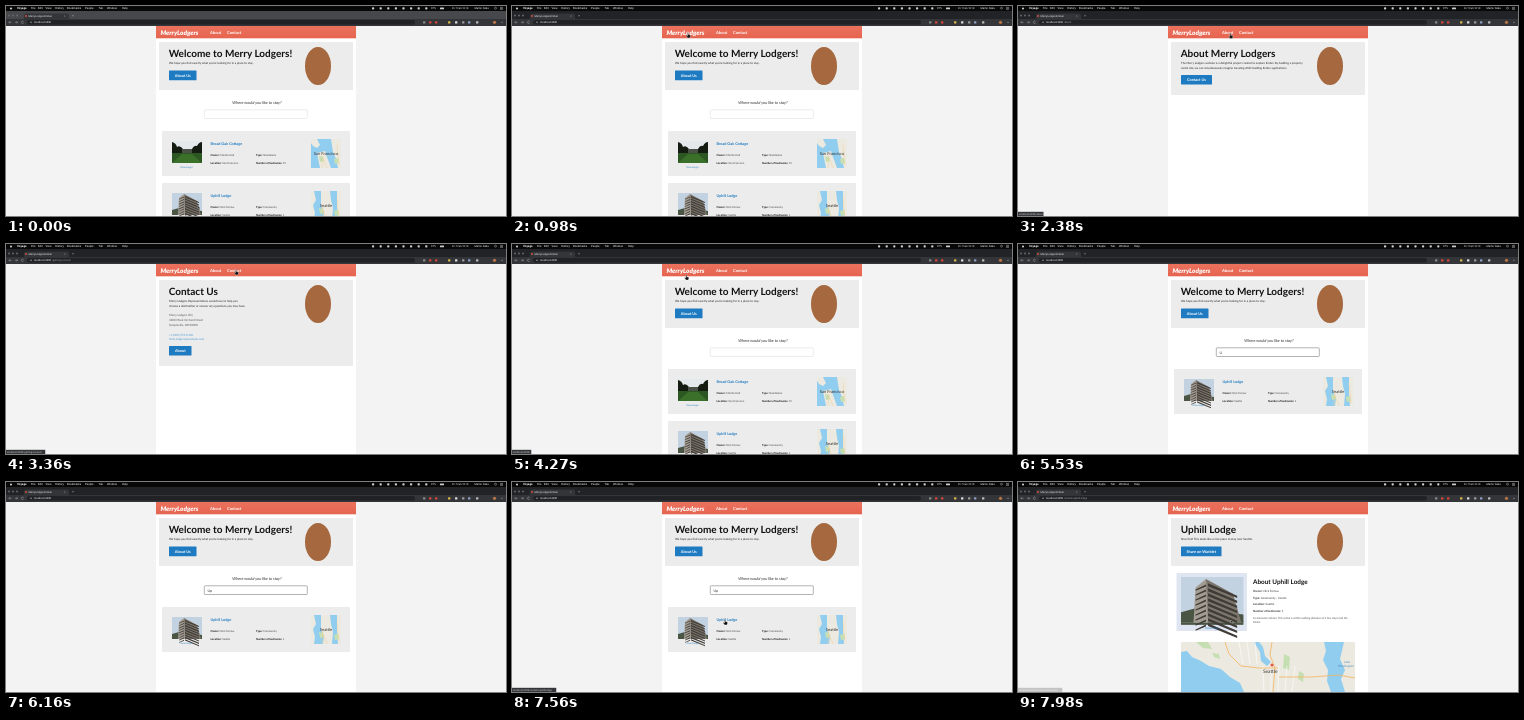
Animation of 500x210 px, one loop 8 s. Source, as an HTML page:

```html
<!DOCTYPE html>
<html lang="en">
<head>
<meta charset="utf-8">
<title>MerryLodgers</title>
<style>
html, body { margin: 0; width: 100%; height: 100%; overflow: hidden; background: #f3f3f3; }
svg { display: block; width: 100vw; height: 100vh; }
svg svg { width: auto; height: auto; }
text { font-family: Lato, sans-serif; white-space: pre; text-rendering: geometricPrecision; }
.ui text { font-family: Roboto, sans-serif; }
</style>
</head>
<body>
<svg id="stage" viewBox="0 0 500 210"></svg>
<script>
const LOOP = 8000;
const BLUE = '#1f7bc1', GREY = '#ececec', WATER = '#90cdef', LAND = '#ece9e1', HOST = 'localhost:4200';
const stage = document.getElementById('stage');

const rect = (x, y, w, h, fill, more = '') =>
  `<rect x="${x}" y="${y}" width="${w}" height="${h}" fill="${fill}" ${more}/>`;
const text = (x, y, size, str, fill = '#222', more = '') =>
  `<text x="${x}" y="${y}" font-size="${size}" fill="${fill}" ${more}>${str}</text>`;
const path = (d, fill, more = '') => `<path d="${d}" fill="${fill}" ${more}/>`;
const dot = (x, y, r, fill) => `<circle cx="${x}" cy="${y}" r="${r}" fill="${fill}"/>`;
const group = (id, body, more = '') => `<g id="${id}" ${more}>${body}</g>`;
const shift = (x, y, body, s = 1) => `<g transform="translate(${x} ${y}) scale(${s})">${body}</g>`;
const frame = (x, y, w, h, body) =>
  `<svg x="${x}" y="${y}" style="width:${w}px;height:${h}px">${body}</svg>`;
const BOLD = 'font-weight="700"', HEAVY = 'font-weight="900"', MID = 'text-anchor="middle"';

function browser() {
  const menu = [[25, 'File'], [32, 'Edit'], [39.5, 'View'], [49, 'History'], [61, 'Bookmarks'],
    [79, 'People'], [92.5, 'Tab'], [101, 'Window'], [116, 'Help']];
  let s = rect(0, 0, 500, 5, '#080808') + rect(0, 5, 500, 8.5, '#222327', 'id="strip"') + rect(0, 13, 500, 7, '#343539');
  s += dot(5, 2.4, 1, '#ddd') + text(11, 3.4, 2.9, 'Voyage', '#fff', BOLD);
  s += menu.map(([x, label]) => text(x, 3.4, 2.8, label, '#fff')).join('');
  for (let x = 366; x < 420; x += 7.6) s += rect(x, 1.3, 2.2, 2.2, '#ccc', 'rx=".7"');
  s += text(425, 3.4, 2.7, '97%', '#fff') + rect(434, 1.5, 4, 1.8, '#ccc', 'rx=".4"');
  s += text(446, 3.4, 2.5, 'Fri 7 Feb 18:18', '#fff') + text(468.5, 3.4, 2.6, 'Martin Falke', '#fff');
  s += '<circle cx="489.5" cy="2.2" r="1" fill="none" stroke="#ddd" stroke-width=".4"/>';
  s += path('M494 1.4h3M494 2.4h3M494 3.4h3', 'none', 'stroke="#ddd" stroke-width=".4"');
  s += [3, 7, 11].map(x => dot(x, 9.5, 1, '#66676b')).join('');
  s += path('M16 13.5q2 0 2-2v-2q0-2 2-2h41q2 0 2 2v2q0 2 2 2z', '#343539');
  s += dot(20, 10, .9, '#e0523b') + text(22.5, 10.9, 2.6, 'MerryLodgersEmber', '#eee');
  s += text(58, 10.9, 2.8, '×', '#bbb') + text(66, 11, 3.5, '+', '#bbb');
  s += rect(21, 14.1, 388, 4.5, '#212226', 'rx="2.2"');
  s += path('M5.5 16.3h-2.6m1-1l-1 1 1 1M9 16.3h2.6m-1-1l1 1-1 1M17.6 15.6a1.2 1.2 0 1 0 0 1.4',
    'none', 'stroke="#bbb" stroke-width=".45"');
  s += dot(25, 16.3, .8, '#999') + text(28, 17.2, 2.6, HOST, '#fff');
  s += '<text id="url" x="45.7" y="17.2" font-size="2.6" fill="#a5a5a8"></text>';
  const icons = [[417, '#888'], [423, '#d9453a'], [429, '#d9453a'], [442, '#d8b84a'], [449, '#ddd'],
    [456, '#999'], [462, '#8aa0c8'], [470, '#bbb']];
  s += icons.map(([x, c]) => rect(x, 15.2, 2.4, 2.4, c, 'rx=".6"')).join('');
  return s + dot(488.5, 16.3, 1.6, '#b97545') + dot(496, 16.3, .5, '#ccc');
}

const nav = rect(150, 20, 200, 12.3, 'url(#red)')
  + text(154.5, 28.6, 6.4, 'MerryLodgers', '#fff', HEAVY + ' font-style="italic"')
  + text(204, 28, 4.1, 'About', '#fff', BOLD) + text(221, 28, 4.1, 'Contact', '#fff', BOLD);

// Grey banner with heading, mascot shape and button
const banner = (h, title, body, btnY, btnW, label) => rect(153, 36, 194, h, GREY)
  + text(162.7, 51, 10, title, '#111', BOLD) + body
  + '<ellipse cx="312" cy="60" rx="13" ry="19" fill="#a5683f"/>'
  + rect(163, btnY, btnW, 9.6, BLUE, 'rx=".5"')
  + text(163 + btnW / 2, btnY + 6.2, 3.85, label, '#fff', BOLD + ' ' + MID);

const lawn = rect(0, 0, 30, 22, '#e4e9ec') + path('M0 13V1q4 1 5 5 3-2 6 2h9q2-4 5-3 2-4 5-4v12z', '#141c12')
  + rect(10, 8, 10, 4, '#4b5047') + rect(0, 12, 30, 10, '#2c5622') + path('M0 22l10-9h10l10 9z', '#3a7029');

function tower() {
  let s = rect(0, 0, 30, 22, '#c3d2e1') + path('M0 22v-5l7-2 23 3v4z', '#4a5544')
    + path('M12 1l13 7 4 14H12z', '#7d766d') + path('M12 1L7 5 6 22h7z', '#a29c92');
  for (let y = 3; y < 23; y += 2.4)
    s += path(`M7 ${y + 3}l5-2.4v1l-5 2zM13 ${y}l14 6v1.1l-14-5.7z`, '#403c37');
  return s;
}

const cityMap = (label, land) => rect(0, 0, 30, 29, WATER) + path(land, LAND)
  + path('M8 17l4 1 1 4-4 1zM23 20l4-1 1 5-4 1z', '#c5dfb2')
  + path('M11 29L12 15M12 19l4 10M26 6l2 20', 'none', 'stroke="#f2cf8e" stroke-width=".5"')
  + text(15, 15.5, 4.1, label, '#333', MID);
const bayMap = cityMap('San Francisco', 'M0 0h6l3 6-3 3-4-2-2-3zM6 14l8-2 2 6 4 11H9zM20 0h10v29h-3l-2-9-3-7z');
const soundMap = cityMap('Seattle', 'M0 0h3l2 9-3 5 2 8-1 7H0zM10 0h9l1 9 2 8-1 12H12l1-8-3-6zM26 0h4v29h-3l-1-12z');

function card(home) {
  const fact = (x, y, key, val) =>
    text(x, y, 2.7, `<tspan font-weight="700" fill="#111">${key}:</tspan> ${val}`, '#444');
  return rect(156, 125, 188, 45, GREY) + frame(166, 135, 29.5, 22, home.photo)
    + text(180.5, 162.3, 2.4, 'View Larger', BLUE, MID)
    + text(204.5, 139.3, 3.75, home.title, BLUE, BOLD)
    + fact(204.5, 149.7, 'Owner', home.owner) + fact(250, 149.7, 'Type', home.type)
    + fact(204.5, 158, 'Location', home.city) + fact(250, 158, 'Number of bedrooms', home.beds)
    + frame(305, 133, 30, 29, home.map);
}
const cottage = { title: 'Broad Oak Cottage', owner: 'Merida Holt', type: 'Standalone', city: 'San Francisco', beds: 15, photo: lawn, map: bayMap };
const lodge = { title: 'Uphill Lodge', owner: 'Nick Farrow', type: 'Community', city: 'Seattle', beds: 1, photo: tower(), map: soundMap };

const home = banner(48, 'Welcome to Merry Lodgers!',
    text(163, 58.4, 2.9, "We hope you find exactly what you're looking for in a place to stay."), 64.6, 27.5, 'About Us')
  + text(251, 98.4, 4, 'Where would you like to stay?', '#333', MID + ' font-style="italic"')
  + rect(198.3, 103.8, 103, 8.7, '#fff', 'id="field" rx=".8" stroke-width=".5"')
  + '<text id="query" x="201.5" y="109.5" font-size="3.6" fill="#333"></text>'
  + group('all', card(cottage) + shift(0, 52, card(lodge))) + group('found', card(lodge));

const about = banner(53, 'About Merry Lodgers',
  text(163, 58.4, 2.85, 'The Merry Lodgers website is a delightful project created to explore Ember. By building a property')
  + text(163, 63, 2.85, 'rental site, we can simultaneously imagine traveling AND building Ember applications.'),
  69, 31, 'Contact Us');

const contact = banner(86, 'Contact Us',
  text(163, 58.4, 2.9, 'Merry Lodgers Representatives would love to help you')
  + text(163, 63, 2.9, 'choose a destination or answer any questions you may have.')
  + ['Merry Lodgers HQ', '3480 Mock Orchard Street', 'Sampleville, OR 00000']
    .map((line, i) => text(163, 72.4 + i * 4.7, 2.9, line, '#555')).join('')
  + text(163, 91.5, 2.9, '+1 (000) 555-0100', '#4d9bd3') + text(163, 96.2, 2.9, 'hello.lodgers@example.com', '#4d9bd3'),
  102, 22.5, 'About');

function bigMap() {
  let s = rect(0, 0, 174, 50, LAND);
  s += path('M0 10l6-1 5 6 9 4 8 5 12 3 9 8 10 6 4 9H0z', WATER);
  s += path('M78 0l4 5 2 9 6 6-4 4-6-5-1-9-6-10zM143 0l2 9-3 9 5 10-1 11 4 11h14l-4-13 4-9-5-11 4-17z', WATER);
  s += path('M15 0l12 0 4 7-9-1zM31 11l7 1 1 5-6-2zM103 12l6 3-1 13-6-2zM118 29l5 3-1 8-5-3z', '#c5dfb2');
  for (let i = 0; i < 8; i++)
    s += path(`M${58 + i * 8} ${i < 3 ? 0 : 24}l${4 - i} ${i < 3 ? 22 : 26}`, 'none', 'stroke="#fff" stroke-width=".6"');
  s += path('M91 0l-2 13 5 13-2 24M44 0l4 12 12 12 18 2 19 0M98 35l32 0 28-2 16 3', 'none', 'stroke="#f3b45d" stroke-width=".8"');
  s += dot(91, 23, 1.6, '#e25b45') + text(82, 31, 4.8, 'Seattle', '#333');
  return s + text(166, 21, 3, 'Lake', '#5287b8', MID) + text(165, 25, 3, 'Washington', '#5287b8', MID);
}

const detailFacts = [['Owner', 'Nick Farrow'], ['Type', 'Community - Condo'], ['Location', 'Seattle'], ['Number of bedrooms', '1']]
  .map(([key, val], i) => text(235, 110.3 + i * 6.5, 2.9, `<tspan font-weight="700">${key}:</tspan> ${val}`, '#333')).join('');
const detail = banner(48, 'Uphill Lodge',
    text(163, 58.4, 2.9, 'Nice find! This looks like a nice place to stay near Seattle.'), 64.6, 40.5, 'Share on Warblet')
  + rect(158.5, 91, 70.5, 58, '#dfe6f1') + shift(163, 95, frame(0, 0, 30, 22.4, rect(0, 21, 30, 2, '#4a5544') + tower()), 2.08)
  + text(194, 146.7, 2.7, 'View Larger', BLUE, MID) + text(235, 101.6, 6.4, 'About Uphill Lodge', '#111', BOLD)
  + detailFacts
  + text(235, 136.6, 2.85, 'A commuters dream. This rental is within walking distance of 2 bus stops and the', '#555', 'font-style="italic"')
  + text(235, 141, 2.85, 'Metro.', '#555', 'font-style="italic"')
  + frame(163, 160, 174, 50, bigMap());

const pages = { home, about, contact, detail };
const urls = { home: '', about: '/about', contact: '/getting-in-touch', detail: '/rentals/uphill-lodge' };
const LINE = 'stroke="#fff" stroke-width=".35"';
const pointers = {
  arrow: shift(0, 0, path('M0 0v4.2l1-.9.8 1.7.8-.4-.8-1.6h1.3z', '#111', LINE), .75),
  hand: path('M-.5-.5q.5-.6 1 0v2l2 .5v1.5l-.6 1.4h-2.2l-1.6-2 .5-.6.9.6z', '#111', LINE),
  beam: path('M-.8-2.3h1.6M0-2.3v4.6M-.8 2.3h1.6', 'none', 'stroke="#222" stroke-width=".5"')
};

stage.innerHTML = '<defs><linearGradient id="red" x2="0" y2="1"><stop stop-color="#ec725e"/><stop offset="1" stop-color="#e6644f"/></linearGradient></defs>'
  + rect(0, 0, 500, 210, '#f3f3f3') + rect(150, 20, 200, 190, '#fff')
  + Object.keys(pages).map(id => group(id, pages[id])).join('') + nav
  + group('browser', browser(), 'class="ui"')
  + group('status', rect(0, 205.8, 20, 4.2, '#35363a', 'id="plate"') + '<text id="hint" x=".8" y="208.8" font-size="2.5" fill="#d0d0d3"></text>', 'class="ui"')
  + group('pointer', Object.keys(pointers).map(id => group(id, pointers[id])).join(''));

const pageAt = [[0, 'home'], [1400, 'about'], [2800, 'contact'], [3710, 'home'], [7630, 'detail']];
const hintAt = [[0, null], [1190, urls.about], [2450, urls.contact], [3500, '/'], [4760, null], [7420, urls.detail]];
const queryAt = [[0, ''], [5530, 'U'], [5880, 'Up']];
const pointerAt = [[0, 'arrow'], [500, 'hand'], [4340, 'arrow'], [4900, 'beam'], [5400, null],
  [6440, 'beam'], [6860, 'arrow'], [7280, 'hand'], [7700, 'arrow']];
const track = [[0, 192, 200], [280, 192, 200], [560, 176, 27], [980, 176, 27], [1260, 209, 28], [2310, 209, 28],
  [2590, 230, 26], [3360, 230, 26], [3640, 172, 27], [4200, 172, 27], [4690, 212, 101], [4900, 215, 109],
  [6790, 215, 109], [7210, 213, 138], [LOOP, 213, 138]];
const FADE = 280, hintEnds = [4760, 8050];

const $ = id => document.getElementById(id);
const show = (id, on) => $(id).setAttribute('visibility', on ? 'inherit' : 'hidden');
const at = (list, t) => list.filter(step => step[0] <= t).pop()[1];

function pointerPos(t) {
  const i = track.findIndex(p => p[0] > t);
  const [t0, x0, y0] = track[i - 1], [t1, x1, y1] = track[i];
  const k = (t - t0) / (t1 - t0), e = k * k * (3 - 2 * k);
  return [x0 + (x1 - x0) * e, y0 + (y1 - y0) * e];
}

function draw(t) {
  const page = at(pageAt, t), hint = at(hintAt, t), query = at(queryAt, t), shape = at(pointerAt, t);
  for (const id in pages) show(id, id === page);
  $('strip').setAttribute('fill', t < 980 ? '#47484c' : '#222327');
  $('url').textContent = urls[page];
  $('query').textContent = query;
  show('all', !query && page === 'home');
  show('found', query && page === 'home');
  $('field').setAttribute('stroke', t >= 5110 ? '#666' : '#d8d8d8');
  show('status', hint !== null);
  $('status').setAttribute('opacity', Math.min(1, (hintEnds.find(end => end > t) - t) / FADE));
  $('hint').textContent = HOST + (hint || '');
  $('plate').setAttribute('width', 18 + (hint || '').length * 1.25);
  for (const id in pointers) show(id, id === shape);
  $('pointer').setAttribute('transform', `translate(${pointerPos(t)})`);
}

function tick() {
  draw(performance.now() % LOOP);
  requestAnimationFrame(tick);
}
tick();
</script>
</body>
</html>
```
